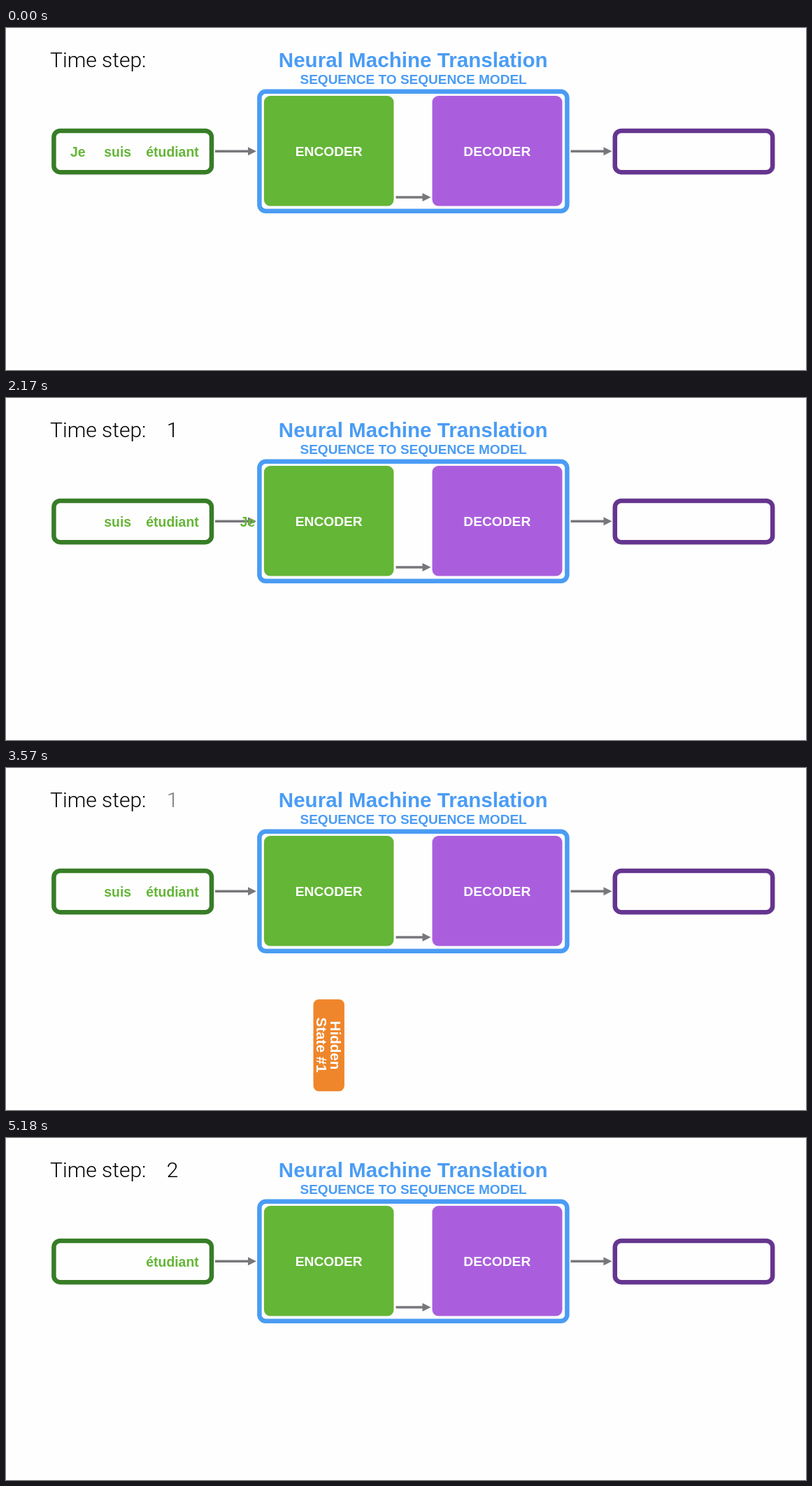
An HTML page for the animation above (5.25 s loop, 1144 by 489 pixels).

```html
<!DOCTYPE html>
<html lang="en">
<head>
<meta charset="utf-8">
<title>Sequence to sequence model</title>
<style>
  html, body { margin: 0; width: 100%; height: 100%; overflow: hidden; background: #fefefe; }
  svg { display: block; width: 1144px; height: 489px; }
  text { font-family: "Liberation Sans", Arial, sans-serif; font-weight: 700; text-anchor: middle; }
  .light { font-family: Roboto, Inter, sans-serif; font-weight: 300; font-size: 30px; }
  .frame { fill: none; stroke-width: 6.5; }
  .word { font-size: 19.4px; fill: #64b637; }
  .label { font-size: 19.2px; fill: #fff; }
  .state { font-size: 20.6px; fill: #fff; }
  .title { fill: #4a9cf4; }
</style>
</head>
<body>
<svg viewBox="0 0 1144 489">
  <defs>
    <g id="arrow">
      <path d="M0 0H48" stroke="#77787b" stroke-width="3.4"/>
      <path d="M47 -6L59 0L47 6Z" fill="#77787b"/>
    </g>
  </defs>

  <text class="light" x="63" y="56" style="text-anchor:start">Time step:</text>
  <text class="light" id="one" x="238" y="56">1</text>
  <text class="light" id="two" x="238" y="56">2</text>

  <text class="title" x="582.2" y="55.8" font-size="29.6">Neural Machine Translation</text>
  <text class="title" x="582.6" y="80.3" font-size="19.05">SEQUENCE TO SEQUENCE MODEL</text>

  <rect class="frame" x="68.4" y="147" width="225.6" height="59.2" rx="9" stroke="#377d27"/>
  <rect class="frame" x="362.4" y="90.8" width="440" height="171" rx="9" stroke="#4a9cf4"/>
  <rect class="frame" x="870.8" y="147" width="225.4" height="59.2" rx="9" stroke="#65358f"/>
  <use href="#arrow" x="299" y="176.3"/>
  <use href="#arrow" x="807.5" y="176.3"/>
  <g transform="translate(557.5 242)">
    <path d="M0 0H39" stroke="#77787b" stroke-width="3.4"/>
    <path d="M38 -6L50 0L38 6Z" fill="#77787b"/>
  </g>

  <text class="word" id="je" x="102.8" y="183.8">Je</text>
  <text class="word" id="suis" x="159.7" y="183.8">suis</text>
  <text class="word" x="238" y="183.8">étudiant</text>

  <g id="state">
    <rect x="-22.2" y="-65.8" width="44.4" height="131.6" rx="8" fill="#ef862b"/>
    <g transform="rotate(90)">
      <text class="state" x="0" y="-2.3">Hidden</text>
      <text class="state" x="-0.5" y="17.7">State #1</text>
    </g>
  </g>

  <g id="encoder">
    <rect x="-92.8" y="-78.8" width="185.6" height="157.6" rx="9" fill="#64b637"/>
    <text class="label" x="0" y="7">ENCODER</text>
  </g>
  <rect x="609.5" y="97" width="186" height="157.6" rx="9" fill="#aa5edd"/>
  <text class="label" x="702.3" y="182.8">DECODER</text>
</svg>
<script>
const LOOP = 5250, STEP = 70;
const TRAVEL = 540;           // slide of a word or of the state
const POP = 490;              // digit shrinking into place
const PULSE = 290;
const CENTRE = 461.7, MIDDLE = 175.8;

const at = {
  one: 1246, je: 1838, pulse: [2357, 4834], out: 2640,
  oneOff: 3450, two: 3723, back: 4315
};

const el = id => document.getElementById(id);
const part = Object.fromEntries(
  ['one', 'two', 'je', 'suis', 'state', 'encoder'].map(id => [id, el(id)]));
const span = (t, start, length) => Math.min(1, Math.max(0, (t - start) / length));
const ease = p => (1 - Math.cos(Math.PI * p)) / 2;
const move = (node, value) => node.setAttribute('transform', value);

function digit(node, t, start, end = Infinity) {
  const p = span(t, start, POP);
  const size = 1 + 8 * (1 - p) ** 4;
  node.style.opacity = p * (1 - span(t, end, 250));
  move(node, `translate(238 45) scale(${size}) translate(-238 -45)`);
}

function word(node, t, start, x) {
  const p = ease(span(t, start, TRAVEL));
  move(node, `translate(${(CENTRE - x) * p} 0)`);
}

function draw(t) {
  digit(part.one, t, at.one, at.oneOff);
  digit(part.two, t, at.two);
  word(part.je, t, at.je, 102.8);
  word(part.suis, t, at.back, 159.7);

  const back = ease(span(t, at.back, TRAVEL));
  const drop = ease(span(t, at.out, TRAVEL)) - back;
  move(part.state, `translate(${CENTRE - back} ${MIDDLE + 220.7 * drop})`);

  const squeeze = at.pulse.reduce(
    (sum, start) => sum + Math.sin(Math.PI * span(t, start, PULSE)) ** 2, 0);
  move(part.encoder, `translate(${CENTRE} ${MIDDLE}) scale(${1 - 0.045 * squeeze})`);
}

const began = performance.now();
function tick() {
  const t = (performance.now() - began) % LOOP;
  draw(Math.floor(t / STEP) * STEP);
  requestAnimationFrame(tick);
}
tick();
</script>
</body>
</html>
```
